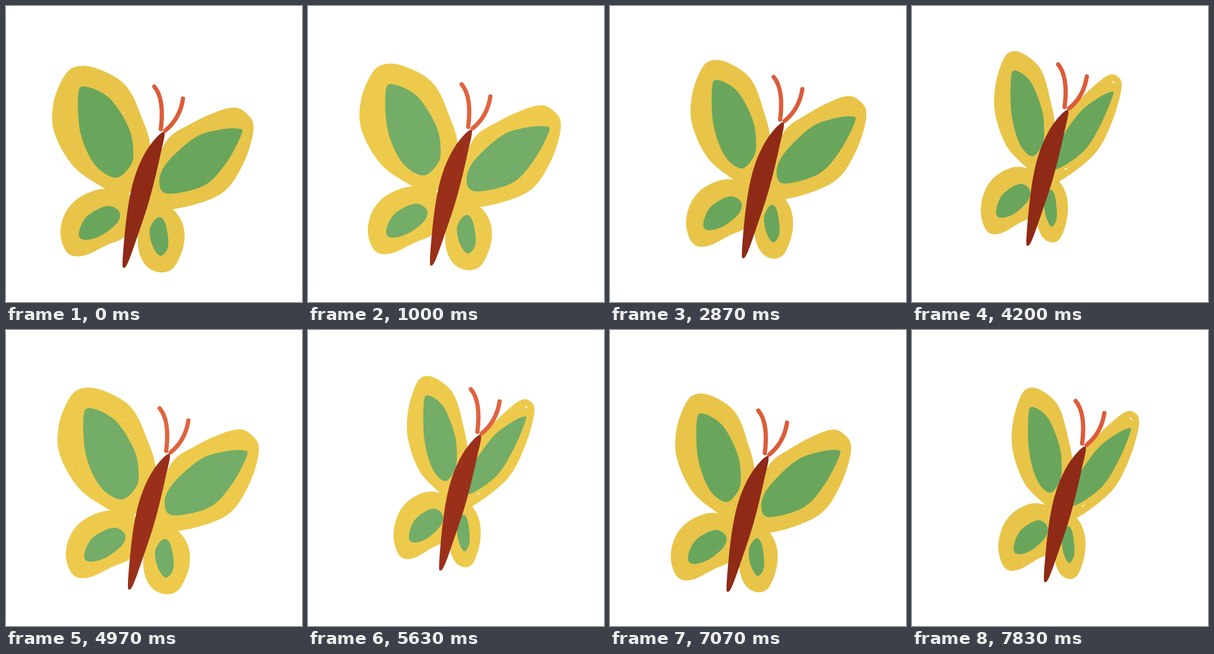
Write an HTML page that moves like this. It is 500x500 px and loops after 7.91 s.

```html
<!DOCTYPE html>
<html lang="en">
<head>
<meta charset="utf-8">
<title>Butterfly</title>
<style>
  html, body { margin: 0; width: 100%; height: 100%; overflow: hidden; background: #fff; }
  svg { display: block; width: 100%; height: 100%; }
  svg { --yellow: #e8c449; --green: #69a65c; --body: #8f2a16; --feeler: #dc5c39; }
  svg.pale { --yellow: #edca4c; --green: #73ad67; --body: #9a301a; --feeler: #e0633f; }
  .yellow { fill: var(--yellow); }
  .green { fill: var(--green); }
  .body { fill: var(--body); }
  .feeler { fill: none; stroke: var(--feeler); stroke-width: 7.2; stroke-linecap: round; }
  .speck { fill: none; stroke: #fff; stroke-width: 1.6; stroke-linecap: round; }
</style>
</head>
<body>
<svg viewBox="0 0 500 500"><g id="fly"></g></svg>
<script>
const svg = document.querySelector('svg');
const fly = document.getElementById('fly');

function add(parent, tag, attrs) {
  const el = document.createElementNS('http://www.w3.org/2000/svg', tag);
  for (const key in attrs) el.setAttribute(key, attrs[key]);
  return parent.appendChild(el);
}

// Closed smooth curve through a few "x,y" points.
function blob(text) {
  const pts = text.split(' ').map(p => p.split(',').map(Number));
  const n = pts.length;
  const at = i => pts[(i + n) % n];
  const handle = (p, from, to) => p.map((v, k) => v + (to[k] - from[k]) / 6);
  return 'M' + pts[0] + pts.map((p, i) => {
    const next = at(i + 1);
    return 'C' + [handle(p, at(i - 1), next), handle(next, at(i + 2), p), next].join(' ');
  }).join('') + 'Z';
}

// Open wings; "fold" closes one fully, "half" is its share of that midway.
const wings = [
  {
    yellow: blob('120,102 155,106 200,132 226,180 243,250 200,325 168,309 115,272 82,215 80,165 98,119'),
    green: blob('134,136 175,156 207,205 215,245 210,270 185,290 150,268 126,215 122,150'),
    fold: [.626, 0, -.023, .94, 98, 18.6], half: .5
  },
  {
    yellow: blob('266,236 312,199 378,172 408,183 418,210 400,268 362,318 283,343 238,335'),
    green: blob('391,207 398,216 372,265 335,303 275,317 259,300 270,267 318,223 360,209'),
    fold: [.708, -.3, -.05, .86, 72, 122], half: .18
  },
  {
    yellow: blob('172,309 128,321 101,348 92,385 104,417 130,422 170,404 205,385 222,330'),
    green: blob('170,338 191,347 188,366 160,388 132,395 123,384 136,356'),
    fold: [.83, 0, 0, 1, 43.6, 0], half: .38
  },
  {
    yellow: blob('280,342 299,370 300,405 284,441 262,450 238,440 224,412 225,370 240,322'),
    green: blob('257,357 269,367 274,405 261,422 247,404 243,376'),
    fold: [.68, 0, 0, .955, 62, 7], half: .53
  }
];
const open = [1, 0, 0, 1, 0, 0];

for (const tone of ['yellow', 'green'])
  for (const wing of wings)
    wing[tone] = add(fly, 'path', { d: wing[tone], class: tone });

// Bare paper showing through the open and the folded wings.
const specks = ['M187 156h.1M199 180h.1M115 233h.1', '', 'M342 165q3 0 3 3M262 313l3 -.5'];
const speck = add(fly, 'path', { class: 'speck' });

add(fly, 'path', { class: 'feeler', d: 'M250.500 136Q268 157 261.500 208' });
add(fly, 'path', { class: 'feeler', d: 'M299 156.500Q294 190 269 210.500' });
add(fly, 'path', {
  class: 'body',
  d: blob('267,213 260,255 242,328 220,395 207,431 200,442 197,430 205,347 218,287 240,240')
});

// The flight goes round three corners, three steps a side, bowed where it runs sideways.
const corners = [[0, 0], [-5, -51], [35, -26]];
const palePlaces = [5, 8];

function drift(place) {
  const side = Math.floor(place / 3);
  const t = place % 3 / 3;
  const ease = t * t * (3 - 2 * t);
  const [x, y] = corners[side];
  const [toX, toY] = corners[(side + 1) % 3];
  const dx = toX - x;
  return [x + dx * ease, y + (toY - y) * ease - dx * Math.sin(Math.PI * t) / 10];
}

const LOOP = 7910, LEAD = 6;

// Steps last 3.3 ticks of a thirtieth of a second, snapped to whole ticks.
const startOf = k => Math.floor(Math.floor(3.3 * k + .15) * 10 / 3) * 10;

function stepAt(time) {
  let k = LEAD;
  while (startOf(k + 1) - startOf(LEAD) <= time) k++;
  const step = (k - LEAD) % 36;
  return step > 4 ? step - 1 : step; // one pose is held twice as long
}

function pose(step) {
  const place = step % 9;
  const phase = 2 - Math.abs(step % 4 - 2); // 0 open, 1 midway, 2 folded
  for (const { yellow, green, fold, half } of wings) {
    const amount = [0, half, 1][phase];
    const matrix = open.map((v, i) => v + (fold[i] - v) * amount);
    for (const el of [yellow, green]) el.setAttribute('transform', `matrix(${matrix})`);
  }
  speck.setAttribute('d', specks[phase]);
  fly.setAttribute('transform', `translate(${drift(place)})`);
  svg.classList.toggle('pale', palePlaces.includes(place));
}

const start = performance.now();

function draw(now) {
  pose(stepAt(Math.max(0, now - start) % LOOP));
  requestAnimationFrame(draw);
}
draw(start);
</script>
</body>
</html>
```
